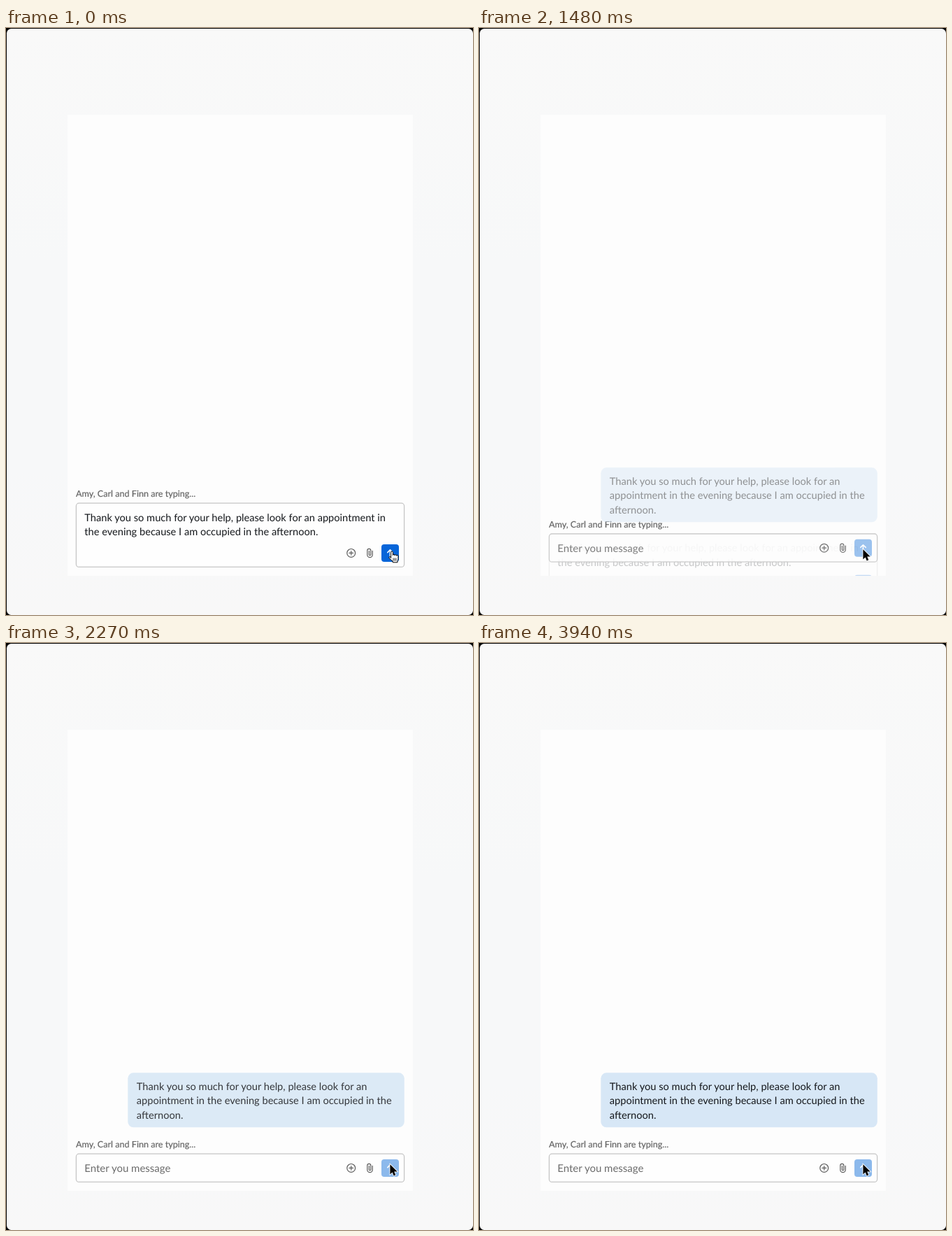
An HTML page for the animation above (4.24 s loop, 668 by 839 pixels).

```html
<!DOCTYPE html>
<html lang="en">
<head>
<meta charset="utf-8">
<title>Sending a chat message</title>
<style>
  html, body { margin: 0; width: 100%; height: 100%; overflow: hidden; background: #000; }
  svg { display: block; width: 100%; height: 100%; }
  text { font: 14.64px Lato, "Open Sans", sans-serif; fill: #15181c; text-rendering: geometricPrecision; }
  .label { font-size: 12.6px; fill: #666; stroke: #666; stroke-width: .2px; }
  .hint { font-size: 15px; fill: #6c6c6c; }
  .field { fill: #fefefe; stroke: #c6c6c6; stroke-width: 1.3; }
  .line { fill: none; stroke: #5a5a5a; stroke-width: 1.2; stroke-linecap: round; stroke-linejoin: round; }
  .up { fill: none; stroke: #fff; stroke-width: 1.5; stroke-linecap: round; stroke-linejoin: round; }
</style>
</head>
<body>
<svg viewBox="0 0 668 839">
  <defs>
    <linearGradient id="wash" x2="0" y2="1">
      <stop offset="0" stop-color="#f9f9f9"/>
      <stop offset=".4" stop-color="#f7f8f9"/>
      <stop offset=".75" stop-color="#f7f8f9"/>
      <stop offset="1" stop-color="#f8f8f8"/>
    </linearGradient>
    <clipPath id="panelClip"><rect x="88" y="124" width="494" height="659"/></clipPath>
    <g id="tools" class="line">
      <circle cx="493.7" cy="750.4" r="5.9"/>
      <path d="M490.9 750.4h5.6M493.7 747.6v5.6"/>
      <path d="M524.2 747.4v5.6a3.7 3.7 0 0 1-7.4 0v-6.2a2.5 2.5 0 0 1 5 0v6a1.2 1.2 0 0 1-2.4 0v-5.4"/>
    </g>
    <path id="up" class="up" d="M549.5 755v-9M545.8 749.6l3.7-3.7 3.7 3.7"/>
  </defs>

  <rect width="668" height="839"/>
  <rect x="1" y="1" width="667" height="838" rx="6.5" fill="url(#wash)"/>
  <rect x="88" y="124" width="494" height="659" fill="#fdfdfd"/>

  <g clip-path="url(#panelClip)">
    <g id="draft">
      <rect class="field" x="100.4" y="679.2" width="469.2" height="91.2" rx="4"/>
      <text x="112.3" y="704.5">Thank you so much for your help, please look for an appointment in</text>
      <text x="112.3" y="725">the evening because I am occupied in the afternoon.</text>
      <use href="#tools"/>
      <rect x="537" y="738" width="25" height="25" rx="4" fill="#0765d9"/>
      <use href="#up"/>
    </g>
    <text id="label" class="label" x="100" y="670">Amy, Carl and Finn are typing...</text>
    <g id="empty">
      <rect class="field" x="100.4" y="730.2" width="469.2" height="40.2" rx="4"/>
      <text class="hint" x="112.3" y="756">Enter you message</text>
      <use href="#tools"/>
      <rect x="537" y="738" width="25" height="25" rx="4" fill="#8cb9ec"/>
      <use href="#up"/>
    </g>
    <g id="bubble">
      <rect x="174.3" y="614.3" width="395.5" height="78" rx="8" fill="#d7e7f6"/>
      <text x="186.8" y="638.5">Thank you so much for your help, please look for an</text>
      <text x="186.8" y="659.2">appointment in the evening because I am occupied in the</text>
      <text x="186.8" y="679.8">afternoon.</text>
    </g>
  </g>

  <g id="hand" transform="translate(546.6 747)" stroke="#000" stroke-linejoin="round" stroke-linecap="round">
    <path fill="#fff" d="M4 10V2.4a1.4 1.4 0 0 1 2.8 0v4.2a1.3 1.3 0 0 1 2.6.3 1.3 1.3 0 0 1 2.6.5 1.2 1.2 0 0 1 2.4.6v3.6q0 1.8-1 3.2v2H6.6v-1.6Q4 13.6 1.5 10.4c-.9-1.6 1-2.5 2.5-.4z"/>
    <path fill="none" stroke-width=".8" d="M7.4 11v3.4M9.4 11v3.4M11.4 11v3.4"/>
  </g>
  <path id="pointer" transform="translate(549.4 745.2)" stroke="#fff" stroke-width="1.6" paint-order="stroke"
    d="M0 0V14.2l3.2-3 2.1 5 2.6-1.1-2.1-4.9h4.5z"/>
</svg>
<script>
  const LOOP = 4240, DRAFT_DROP = 51, BUBBLE_RISE = 99, PENDING = 0.55;
  const [draft, label, empty, bubble, hand, pointer] =
    ["draft", "label", "empty", "bubble", "hand", "pointer"].map(id => document.getElementById(id));

  const easeOut = (t, start, length, power) =>
    1 - (1 - Math.min(1, Math.max(0, (t - start) / length))) ** power;

  function place(el, y, opacity) {
    el.setAttribute("transform", `translate(0 ${y.toFixed(2)})`);
    el.setAttribute("opacity", opacity.toFixed(3));
  }

  function draw(t) {
    const sent = t < 1330 ? 0 : easeOut(t, 1315, 310, 2.55);
    const delivered = easeOut(t, 2225, 225, 5);
    const drop = DRAFT_DROP * sent;

    place(draft, drop, (1 - sent) ** 0.75);
    place(label, drop, 1);
    place(empty, drop - DRAFT_DROP, sent);
    place(bubble, BUBBLE_RISE * (1 - sent), sent * (PENDING + (1 - PENDING) * delivered));
    hand.setAttribute("visibility", sent ? "hidden" : "visible");
    pointer.setAttribute("visibility", sent ? "visible" : "hidden");
  }

  const begin = performance.now();
  function tick() {
    draw((performance.now() - begin) % LOOP);
    requestAnimationFrame(tick);
  }
  tick();
</script>
</body>
</html>
```
